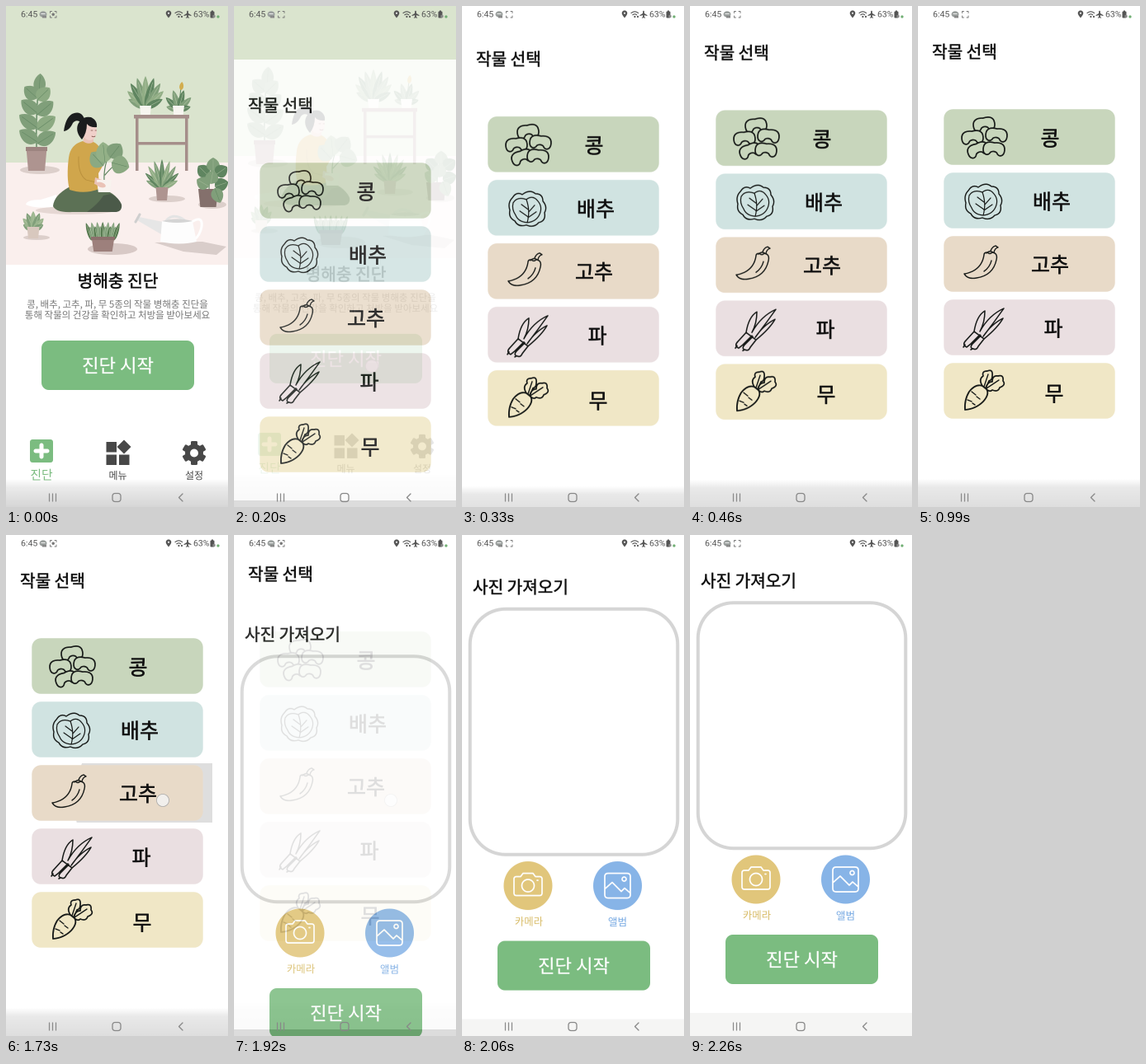
Recreate the animation shown at these times as an HTML page with a canvas. Size 269 by 608 pixels, loop 2.32 s.

```html
<!DOCTYPE html>
<html lang="ko">
<head>
<meta charset="utf-8">
<style>
html, body { margin: 0; width: 100%; height: 100%; overflow: hidden; background: #fff; }
canvas { display: block; width: 100%; height: 100%; }
</style>
</head>
<body>
<canvas id="stage"></canvas>
<script>
const W = 269, H = 608, LOOP = 2320;
const K = Math.max(2, window.devicePixelRatio || 1);
const KR = '"Noto Sans CJK KR", "Noto Sans KR", "Noto Sans CJK", sans-serif';
const GREEN = '#7bbc80', LEAF = '#809f7a', DARK = '#5f8560', POT = '#ae9490';
let g;

function surface(canvas) {
  canvas.width = W * K;
  canvas.height = H * K;
  const c = canvas.getContext('2d');
  c.scale(K, K);
  return c;
}

// ---- drawing helpers ----
function fill(d, color) {
  g.fillStyle = color;
  g.fill(new Path2D(d));
}
function line(d, color, width = 1.6) {
  g.strokeStyle = color;
  g.lineWidth = width;
  g.lineCap = g.lineJoin = 'round';
  g.stroke(new Path2D(d));
}
function rect(x, y, w, h, color) {
  g.fillStyle = color;
  g.fillRect(x, y, w, h);
}
function round(x, y, w, h, r, color) {
  g.beginPath();
  g.roundRect(x, y, w, h, r);
  g.fillStyle = color;
  g.fill();
}
function oval(x, y, rx, ry, color, rot = 0) {
  g.beginPath();
  g.ellipse(x, y, rx, ry, rot, 0, 7);
  g.fillStyle = color;
  g.fill();
}
// y is the visual middle of the Hangul glyphs
function text(s, x, y, size, color, bold = 0, align = 'center') {
  g.font = `400 ${size}px ${KR}`;
  g.textAlign = align;
  g.fillStyle = g.strokeStyle = color;
  g.fillText(s, x, y + size * 0.38);
  if (bold) {
    g.lineWidth = bold;
    g.lineJoin = 'round';
    g.strokeText(s, x, y + size * 0.38);
  }
}
// angle in degrees, 0 points up
function leaf(x, y, len, wid, angle, color, vein) {
  g.save();
  g.translate(x, y);
  g.rotate(angle * Math.PI / 180);
  g.beginPath();
  g.moveTo(0, 0);
  g.bezierCurveTo(-wid, -len * 0.2, -wid * 0.6, -len * 0.8, 0, -len);
  g.bezierCurveTo(wid * 0.6, -len * 0.8, wid, -len * 0.2, 0, 0);
  g.fillStyle = color;
  g.fill();
  if (vein) line(`M0 0V${-len * 0.85}`, vein, 0.5);
  g.restore();
}
// leaves from one base, shorter towards the sides
function fan(x, y, count, spread, len, wid, colors) {
  for (let i = 0; i < count; i++) {
    const u = i / (count - 1) * 2 - 1;
    leaf(x, y, len * (1 - 0.4 * u * u), wid, u * spread, colors[i % colors.length], '#b9cbab');
  }
}
function pot(x, y, w, h, color) {
  g.beginPath();
  g.moveTo(x - w / 2, y);
  g.lineTo(x + w / 2, y);
  g.lineTo(x + w * 0.4, y + h);
  g.lineTo(x - w * 0.4, y + h);
  g.fillStyle = color;
  g.fill();
}

// ---- home illustration ----
function tallPlant() {
  oval(41, 199, 24, 5, '#dccfcb');
  line('M37 173Q36 130 40 92', DARK, 1.4);
  leaf(40, 105, 23, 12, 4, LEAF, DARK);
  [[112, 21], [130, 25], [148, 27], [165, 26]].forEach(([y, len], i) => {
    leaf(38, y, len, 14, -48 - i * 3, LEAF, DARK);
    leaf(38, y + 2, len, 14, 46 + i * 4, i % 2 ? LEAF : '#8caa82', DARK);
  });
  pot(37, 172, 25, 28, POT);
  rect(24, 171, 26, 5, '#9d8480');
}

function shelf() {
  const wood = '#a58e8a';
  fan(169, 124, 9, 62, 39, 7, [LEAF, '#92ae86', DARK]);
  pot(169, 121, 14, 12, '#f7f5f0');
  fan(209, 126, 6, 76, 25, 6, [LEAF, DARK]);
  line('M209 122Q211 110 212 99', DARK, 1);
  leaf(212, 102, 10, 4, 8, '#d2ad4e');
  pot(209, 121, 14, 12, '#f7f5f0');
  rect(155, 132, 67, 4.5, wood);
  rect(157, 136, 3.5, 64, wood);
  rect(217, 136, 3.5, 64, wood);
  rect(160, 165, 58, 3.5, wood);
}

function woman() {
  oval(84, 248, 48, 5, '#e5d7d3');
  fill('M61 229Q49 233 42 235Q25 235 24 241Q36 247 62 243Z', '#fff');
  fill('M76 220Q58 230 57 243Q61 251 80 250L133 250Q141 249 140 241Q133 225 109 220Z', '#5c7155');
  fill('M98 250Q112 240 118 230L127 228Q137 233 140 241Q141 249 133 250Z', '#4b5a49');
  fill('M94 158h12v13q-7 4-13 0z', '#eac3b6');
  fill('M93 164Q78 168 76 184Q73 208 77 223Q95 229 113 222L112 203L119 191Q117 170 106 165Q100 169 93 164Z', '#d0a64c');
  line('M88 183Q87 204 97 211L113 215', '#b88f3c', 0.9);
  fill('M108 208L122 213Q124 218 116 219L107 216Z', '#eac3b6');
  oval(101, 151, 9, 12, '#f0d0ca', -0.1);
  fill('M92 162Q84 153 87 144Q92 133 103 135Q111 139 110 147Q102 148 98 143Q98 154 92 162Z', '#1b1d1e');
  fill('M95 137Q91 126 80 131Q72 136 70 152Q77 151 81 142Q86 136 93 143Z', '#1b1d1e');
  line('M103 151h2M108 151h1.5M104 158q2 1.5 4 0', '#7e5349', 0.8);
  line('M119 213Q118 192 127 177M120 205Q130 193 137 190', DARK, 1.2);
  leaf(118, 194, 22, 17, -42, '#8ba982', DARK);
  leaf(120, 190, 25, 16, -6, '#93b087', DARK);
  leaf(126, 184, 21, 17, 38, LEAF, DARK);
  leaf(128, 190, 22, 18, 105, '#8ba982', DARK);
  pot(119, 211, 18, 15, '#f8f3ee');
  oval(115, 217, 6, 3, '#eac3b6', 0.3);
}

function floorPlants() {
  oval(195, 234, 22, 4, '#dccfcb');
  fan(189, 222, 9, 62, 36, 5, [LEAF, DARK, '#92ae86']);
  pot(189, 220, 15, 16, POT);

  oval(250, 241, 17, 5, '#dccfcb');
  line('M246 225Q246 204 253 190', DARK, 1.2);
  pot(245, 222, 24, 22, '#84706c');
  [[245, 206, -45], [251, 201, 0], [254, 205, 55], [246, 219, -60], [253, 219, 72], [248, 216, 10]]
    .forEach(([x, y, a], i) => leaf(x, y, 17, 13, a, i % 2 ? LEAF : DARK, '#a2b897'));
  leaf(253, 221, 19, 12, 160, LEAF, DARK);

  oval(37, 281, 16, 3, '#dccfcb');
  fan(33, 272, 7, 62, 23, 6, [LEAF, '#9bb58e']);
  pot(33, 268, 15, 14, '#d8c8be');

  oval(129, 295, 30, 7, '#d8c9c6');
  for (let i = 0; i < 13; i++) {
    leaf(104 + i * 2.2, 285, 23 - 5 * (i % 2), 4, (i - 6) * 3, i % 3 ? LEAF : '#55794f', '#bdcfae');
  }
  pot(117.5, 280, 28, 18, '#9d807c');
  rect(103, 280, 29, 4, '#8c706c');
}

function wateringCan() {
  fill('M180 287L238 286L267 292L255 302L215 298Z', '#d9cdca');
  line('M222 264Q239 252 237 268Q235 278 229 283', '#fff', 3);
  line('M193 262Q202 249 218 261', '#e4e4e4', 3);
  fill('M190 262L161 256L159 260L188 277Z', '#e6e6e6');
  line('M162 253L157 262', '#cfcfcf', 3);
  fill('M189 261Q207 256 226 261L231 286Q210 291 187 286Z', '#fdfdfd');
  fill('M189 261Q207 256 226 261Q207 265 189 261Z', '#d4d4d4');
}

// ---- screens ----
function button(y) {
  round(43, y, 185, 60, 9, GREEN);
  text('진단 시작', 135.5, y + 30, 22.3, '#fff', 0.2);
}
function navBack(from, to) {
  const s = g.createLinearGradient(0, 574, 0, H);
  s.addColorStop(0, '#fff');
  s.addColorStop(0.3, from);
  s.addColorStop(1, to);
  rect(0, 574, W, 34, s);
}

function home() {
  rect(0, 0, W, H, '#fff');
  rect(0, 0, W, 190, '#dae4ce');
  rect(0, 190, W, 124, '#faefed');
  tallPlant();
  shelf();
  floorPlants();
  woman();
  wateringCan();
  text('병해충 진단', 135.5, 333.5, 20.3, '#111', 0.6);
  text('콩, 배추, 고추, 파, 무 5종의 작물 병해충 진단을', 135, 361.5, 11.5, '#777');
  text('통해 작물의 건강을 확인하고 처방을 받아보세요', 135, 374.5, 11.5, '#777');
  button(406);
  navBack('#ebebeb', '#d6d6d6');
  round(29, 526, 28, 28, 3, GREEN);
  line('M43 533v14M36 540h14', '#fff', 5);
  text('진단', 43, 568.5, 14.8, GREEN);
  const ink = '#484848';
  rect(121.5, 529, 12.5, 12.5, ink);
  rect(121.5, 544.5, 12.5, 12.5, ink);
  rect(137, 544.5, 12.5, 12.5, ink);
  fill('M143 526.5l8.5 8.5l-8.5 8.5l-8.5-8.5z', ink);
  text('메뉴', 135.5, 569.5, 12, ink);
  g.save();
  g.translate(228, 542.5);
  for (let i = 0; i < 6; i++) {
    round(-4, -14.5, 8, 14, 1.5, ink);
    g.rotate(Math.PI / 3);
  }
  oval(0, 0, 11, 11, ink);
  oval(0, 0, 5, 5, '#fff');
  g.restore();
  text('설정', 228, 569.5, 12, ink);
}

const crops = [
  ['콩', 160, 160, '#c8d6bc', beans],
  ['배추', 162, 237, '#d0e3e1', cabbage],
  ['고추', 160, 313.5, '#e8dac8', chili],
  ['파', 164, 391, '#eadfe1', leek],
  ['무', 165, 470, '#f0e7c6', radish],
];
const INK = '#171a18';
const cardY = i => 125.3 + 77 * i;

function beans(bg) {
  const shape = 'M-13 0C-13-9-5-9 0-8C5-9 13-9 13 0C13 8 6 9 4 4C2 2-2 2-4 4C-6 9-13 8-13 0Z';
  [[80, 144, -0.15], [66, 160, -0.1], [95, 157, 0.1], [73, 175, -0.35], [92, 174, 0.1]].forEach(([x, y, a]) => {
    g.save();
    g.translate(x, y);
    g.rotate(a);
    fill(shape, bg);
    line(shape, INK, 1.7);
    g.restore();
  });
}
function cabbage() {
  line('M61 224Q66 216 73 220Q82 213 89 219Q98 219 98 228Q104 235 100 242Q102 252 93 254Q87 261 78 257Q68 260 64 252Q56 248 58 239Q55 230 61 224Z', INK, 1.4);
  line('M62 230Q67 222 78 226Q86 220 92 228Q98 235 94 244Q90 253 79 254Q68 253 65 245Q60 238 62 230Z', INK, 1.2);
  line('M79 254Q83 240 78 226M81 241l7-8M80 248l10-7M80 238l-8-6M80 247l-10-7', INK, 1.2);
}
function chili() {
  line('M80 302Q78 316 66 322Q59 325 56 325Q60 332 71 330Q91 327 95 308Q97 300 90 299Q87 302 84 299Q80 299 80 302Z', INK, 1.4);
  line('M83 300Q87 296 91 299M88 297Q90 292 94 291L97 293Q93 294 92 299M89 309Q87 317 80 322', INK, 1.4);
}
function leek() {
  line('M68 395Q71 376 81 370Q81 384 75 395Q86 375 104 367Q92 384 79 401Q89 386 103 379Q97 390 80 404', INK, 1.5);
  line('M68 395L58 406Q53 411 59 414L64 410L75 399M76 400L66 410Q62 415 67 416Q71 418 73 413L80 404M68 395L80 404M57 411l-2 3M66 416l-2 1', INK, 1.6);
}
function radish() {
  line('M78 461Q70 458 62 468Q56 478 57 490Q70 489 79 480Q87 471 83 465Z', INK, 1.8);
  line('M78 461Q73 453 79 449Q77 443 84 443Q91 440 90 449Q90 454 86 455L82 464Q84 456 90 456Q90 448 97 449Q104 447 103 455Q107 460 99 463Q97 469 90 466Q87 469 83 465', INK, 1.7);
  line('M80 462L85 447M83 464L98 454M65 468l5 4M60 478l5 2M75 477l-4-3M69 484l-3-2', INK, 1.4);
}

function picker() {
  rect(0, 0, W, H, '#fff');
  text('작물 선택', 17, 55.5, 20.2, '#111', 0.55, 'left');
  crops.forEach(([name, x, y, color, icon], i) => {
    round(31.3, cardY(i), 207.4, 67.5, 11, color);
    icon(color);
    text(name, x, y, 25, '#111', 0.6);
  });
  navBack('#e9e9e9', '#dedede');
}

function photo() {
  rect(0, 0, W, H, '#fff');
  text('사진 가져오기', 13, 55.5, 20.2, '#111', 0.55, 'left');
  g.beginPath();
  g.roundRect(9.7, 82.2, 251.6, 298, 43);
  g.strokeStyle = '#d5d5d5';
  g.lineWidth = 4;
  g.stroke();
  oval(80, 418, 29.5, 29.5, '#e1c67b');
  oval(188.5, 418, 29.5, 29.5, '#87b4e7');
  line('M66 407h5l3-4h12l3 4h5q3 0 3 3v17q0 3-3 3h-28q-3 0-3-3v-17q0-3 3-3zM87.5 418a7.5 7.5 0 1 1-15 0a7.5 7.5 0 1 1 15 0M91 411.5h1', '#fff', 1.7);
  line('M177 403h23q4 0 4 4v22q0 4-4 4h-23q-4 0-4-4v-22q0-4 4-4zM173 422l9-8l11 11l4-4l7 6M199 410a2.5 2.5 0 1 1-5 0a2.5 2.5 0 1 1 5 0', '#fff', 1.7);
  text('카메라', 81, 461.5, 12.4, '#d9bd69');
  text('앨범', 188.5, 461.5, 12.6, '#76a9e3');
  button(485);
  rect(0, 580, W, 28, '#f5f5f4');
}

function systemIcons(t) {
  const ink = '#555';
  g.font = '10.5px Roboto, sans-serif';
  g.fillStyle = ink;
  g.textAlign = 'left';
  g.fillText('6:45', 18, 13.7);
  g.fillText('63%', 227, 13.7);
  oval(45, 10, 4.5, 3.8, '#9a9f9d');
  rect(42.5, 9, 5, 1, '#eee');
  rect(44, 12, 5, 2.5, '#888');
  line('M53.5 8.5v-2h2M59 6.5h2v2M61 12v2h-2M55.5 14h-2v-2', '#777', 0.9);
  if (t < 130 || (t >= 1390 && t < 2060)) oval(57.2, 10.2, 1.7, 1.7, '#777');
  fill('M197 14.5Q193.7 10.5 193.7 8.7A3.3 3.3 0 0 1 200.3 8.7Q200.3 10.5 197 14.5Z', ink);
  oval(197, 8.7, 1.1, 1.1, '#eee');
  line('M205 8.6q4.3-3.6 8.6 0M206.8 10.8q2.5-2 5 0', ink, 1.1);
  oval(209.4, 13, 1.1, 1.1, ink);
  oval(213, 13, 1.1, 1.1, ink);
  fill('M220 5.5l.9 1v2.4l3.6 2.2v1l-3.6-1v2l1.2 1v.6l-2.1-.5l-2.1.5v-.6l1.2-1v-2l-3.6 1v-1l3.6-2.2v-2.4z', ink);
  round(247.5, 6.5, 5, 8, 1, ink);
  rect(249, 5.5, 2, 1.5, ink);
  oval(252, 12.5, 1.7, 1.7, '#888');
  oval(257, 13, 1.6, 1.6, '#6fae72');
  line('M52.5 592v9M56.5 592v9M60.5 592v9', '#888', 1.2);
  g.beginPath();
  g.roundRect(129, 591.5, 10, 10, 3);
  g.lineWidth = 1.3;
  g.stroke();
  line('M214 592l-4.5 4.5l4.5 4.5', '#888', 1.3);
}

// ---- playback ----
const stage = surface(document.getElementById('stage'));
const pages = [home, picker, photo].map(paint => {
  const canvas = document.createElement('canvas');
  g = surface(canvas);
  paint();
  return canvas;
});
const show = (page, y) => g.drawImage(page, 0, y, W, H);

const taps = [
  { down: 60, ripple: 75, open: 120, x: 167, y: 437, shade: 0.07 },
  { down: 1530, ripple: 1560, open: 1840, x: 190, y: 322, shade: 0.13 },
];

function ripple(tap, first, t) {
  if (t < tap.ripple) return;
  g.save();
  const area = new Path2D();
  if (first) {
    area.roundRect(43, 406, 185, 60, 9);
  } else {
    area.rect(20, 277, 230, 72);
    area.roundRect(31.3, cardY(2), 207.4, 67.5, 11);
  }
  g.clip(area, 'evenodd');
  const r = (t - tap.ripple) * 0.63;
  const fade = Math.min(1, Math.max(0, (tap.open + 60 - t) / 60));
  oval(tap.x, tap.y, r, r, `rgba(0,0,0,${tap.shade * fade})`);
  g.restore();
}

function draw(t) {
  g = stage;
  const n = t < taps[1].down ? 0 : 1;
  const tap = taps[n];
  const u = t - tap.open;
  const alpha = Math.min(1, Math.max(0, u / 94));
  rect(0, 0, W, H, '#000');
  if (alpha < 1) {
    const lift = Math.max(0, u) * 0.1;
    g.save();
    g.translate(0, -lift);
    show(pages[n], 0);
    ripple(tap, n === 0, t);
    g.restore();
    if (t >= tap.down) {
      oval(tap.x, tap.y, 7.5, 7.5, 'rgba(242,242,242,.85)');
      g.strokeStyle = '#aaa';
      g.lineWidth = 0.8;
      g.stroke();
    }
  } else {
    rect(0, 0, W, H, '#fff');
  }
  if (alpha > 0) {
    const drop = u < 80 ? 66 + (80 - u) * 0.6 : 66 * Math.exp((80 - u) / 65);
    g.globalAlpha = alpha;
    show(pages[n + 1], drop < 0.4 ? 0 : drop);
    g.globalAlpha = 1;
  }
  systemIcons(t);
}

const start = performance.now();
function tick() {
  draw((performance.now() - start) % LOOP);
  requestAnimationFrame(tick);
}
tick();
</script>
</body>
</html>
```
